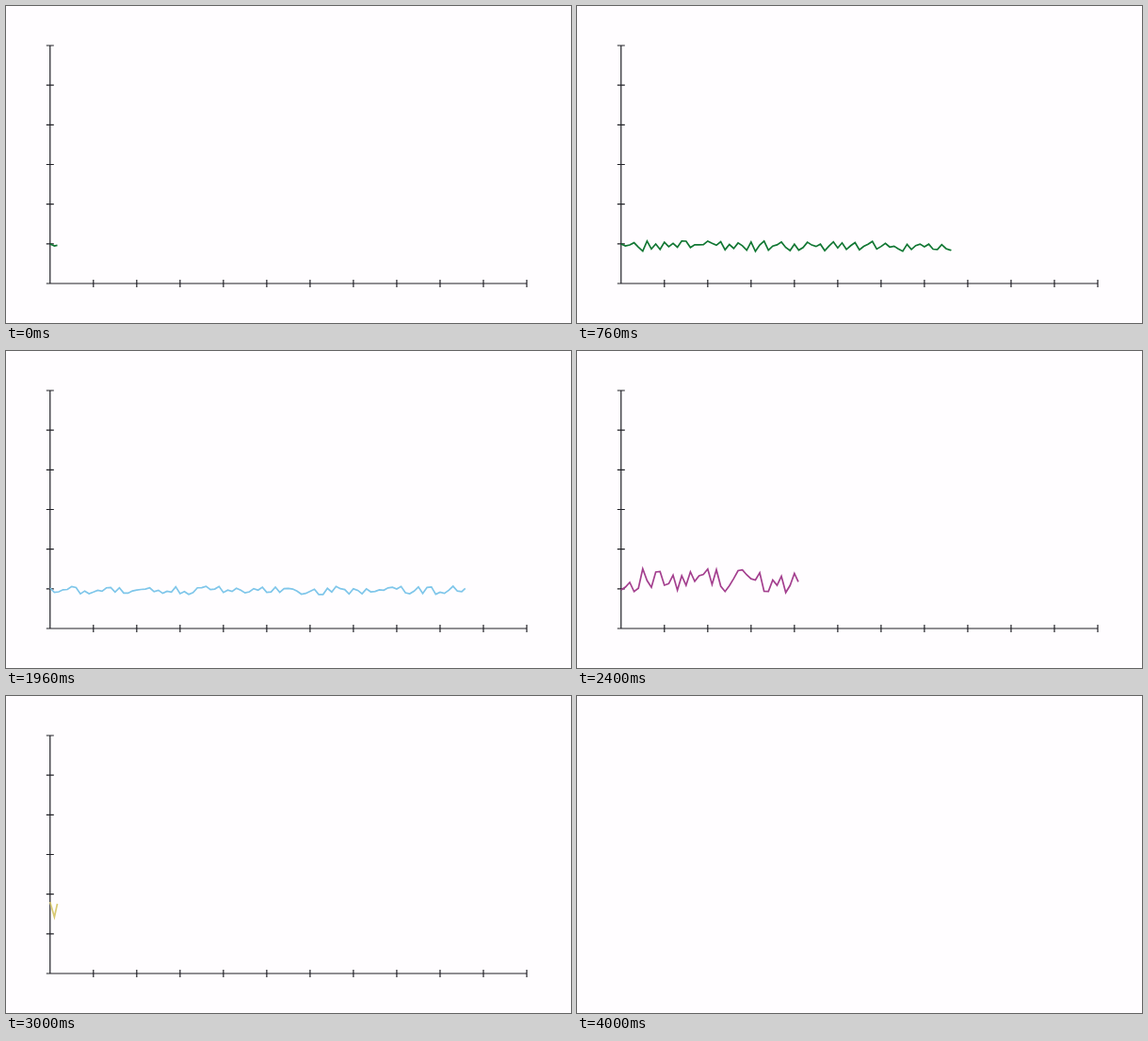
Recreate the animation shown at these times as an HTML page with a canvas. Size 600 by 337 pixels, loop 5000 ms.

```html
<!DOCTYPE html>
<html lang="en">
<head>
<meta charset="utf-8">
<title>Four series</title>
<style>
  html, body { margin: 0; width: 100%; height: 100%; overflow: hidden; background: #fffdff; }
  canvas { display: block; width: 600px; height: 337px; }
</style>
</head>
<body>
<canvas id="stage" width="600" height="337"></canvas>
<script>
const ctx = document.getElementById('stage').getContext('2d');

const LOOP = 5000, TURN = 1000, STEP = 40;
const LEFT = 46.8, TOP = 42, RIGHT = 553, BASE = 295;
const X_TICKS = 11, Y_TICKS = 6, TICK = 4;
const COUNT = 100, GAP = (RIGHT - LEFT) / X_TICKS / 10;
const TIP_START = 54.5, TIP_STEP = 18.05;

// Each series opens with a few set heights, then wanders between low and high.
const series = [
  { color: '#117733', low: 249.5, high: 261, seed: 918273, open: [253, 255, 254] },
  { color: '#7fc6ea', low: 250, high: 259, seed: 564738, open: [252, 256.5, 256] },
  { color: '#a4408f', low: 231, high: 258, seed: 372819, open: [254, 251, 246] },
  { color: '#d8ca72', low: 213, high: 239.5, seed: 746251, open: [219, 235, 214] }
];

function random(seed) {
  return () => (seed = (seed * 16807) % 2147483647) / 2147483647;
}

for (const s of series) {
  const next = random(s.seed);
  s.ys = Array.from({ length: COUNT }, (_, i) =>
    s.open[i] ?? s.low + next() * (s.high - s.low));
}

function line(x0, y0, x1, y1) {
  ctx.moveTo(x0, y0);
  ctx.lineTo(x1, y1);
}

function drawAxes() {
  ctx.strokeStyle = '#202026';
  ctx.lineWidth = 1.2;
  ctx.beginPath();
  line(LEFT, TOP, LEFT, BASE);
  line(LEFT, BASE, RIGHT, BASE);
  for (let i = 0; i <= Y_TICKS; i++) {
    const y = TOP + (BASE - TOP) * i / Y_TICKS;
    line(LEFT - TICK, y, LEFT + TICK, y);
  }
  for (let i = 1; i <= X_TICKS; i++) {
    const x = LEFT + (RIGHT - LEFT) * i / X_TICKS;
    line(x, BASE - TICK, x, BASE + TICK);
  }
  ctx.stroke();
}

function drawSeries({ color, ys }, step) {
  const tip = TIP_START + TIP_STEP * step;
  const end = (tip - LEFT) / GAP;
  const last = Math.floor(end);
  ctx.strokeStyle = color;
  ctx.lineWidth = 1.7;
  ctx.beginPath();
  for (let i = 0; i <= last; i++) ctx.lineTo(LEFT + i * GAP, ys[i]);
  ctx.lineTo(tip, ys[last] + (ys[last + 1] - ys[last]) * (end - last));
  ctx.stroke();
}

function draw(time) {
  const t = time % LOOP;
  ctx.fillStyle = '#fffdff';
  ctx.fillRect(0, 0, 600, 337);
  const current = series[Math.floor(t / TURN)];
  if (!current) return;
  drawAxes();
  drawSeries(current, Math.floor(t % TURN / STEP));
}

let start;
function tick(now) {
  start ??= now;
  draw(now - start);
  requestAnimationFrame(tick);
}
draw(0);
requestAnimationFrame(tick);
</script>
</body>
</html>
```
